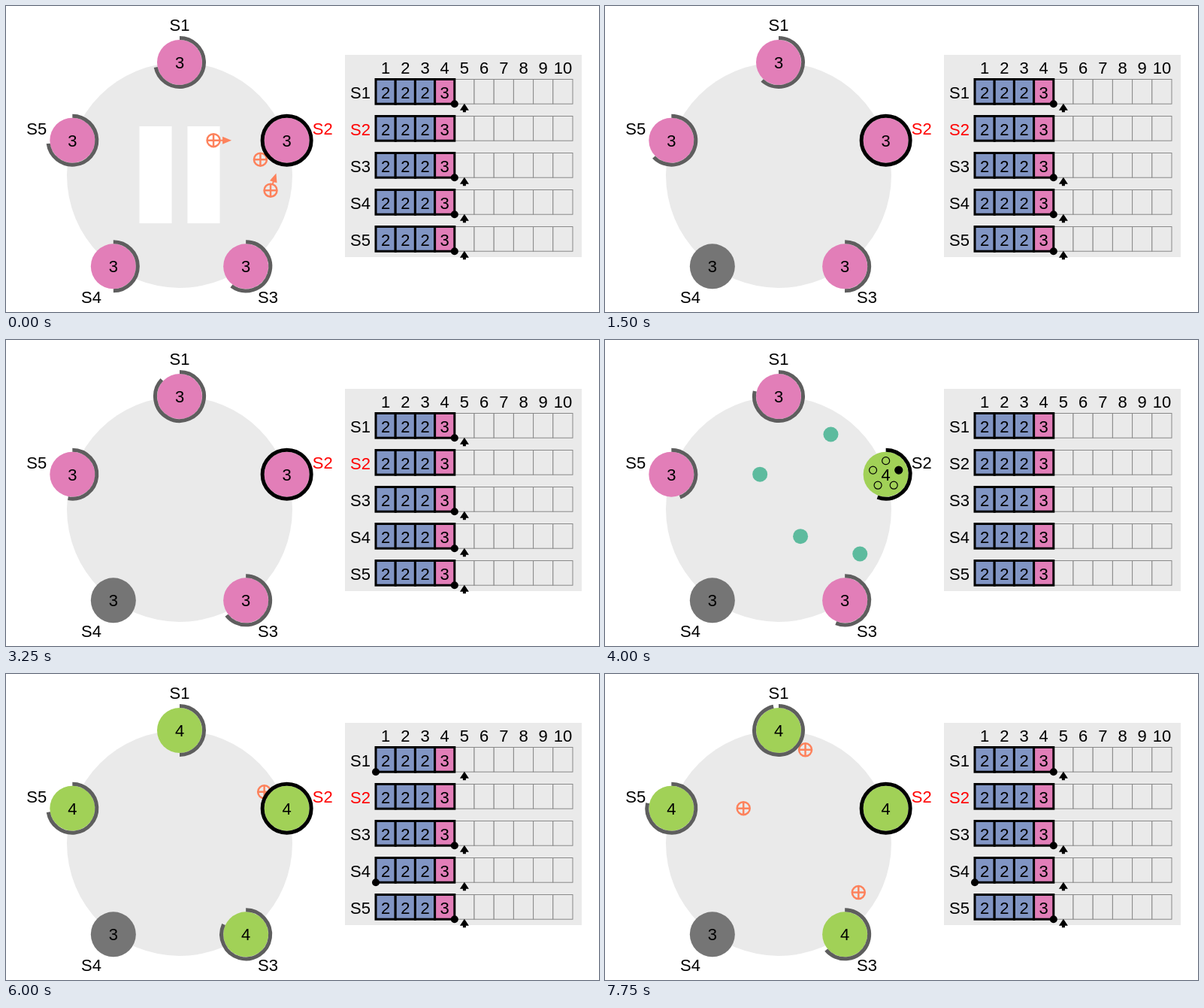
An HTML page that plays this animation: 789 by 407 pixels, repeating every 8 s.

```html
<!DOCTYPE html>
<html lang="en">
<head>
<meta charset="utf-8">
<title>Cluster election</title>
<style>
  html, body { margin: 0; width: 100%; height: 100%; overflow: hidden; background: #fff; }
  svg { display: block; width: 789px; height: 407px; }
  text { font: 22px "Liberation Sans", Arial, sans-serif; text-anchor: middle; }
</style>
</head>
<body>
<svg id="stage" viewBox="0 0 789 407"></svg>
<script>
const TERM = { 2: '#8195c4', 3: '#e27eb8', 4: '#a1d157' };
const APPEND = '#fd825c', VOTE = '#5dbb9e', PANEL = '#eaeaea';
const LEADER = 2, STOPPED = 4, CANDIDACY = 69.8, ELECTED = 95.7;
const R = 30, RING = 32.5, DEG_PER_MS = 1.8;

// Rounds of calls from the leader: [peer, request latency, reply latency, new timer angle]
const rounds = [
  { sent: -22, color: APPEND, calls: [[1, 10, 10, 280], [3, 13.8, 12.5, 231], [4, 10.25, 12.5, 201], [5, 13.25, 12.5, 278]] },
  { sent: 28.5, color: APPEND, calls: [[1, 10.4, 12.6, 351], [3, 13, 11.4, 265.5], [4, 12, 0, 0], [5, 13.5, 12.9, 222.5]] },
  { sent: CANDIDACY, color: VOTE, calls: [[1, 13.85, 13.5, 246], [3, 10.3, 12, 298.5], [4, 14.7, 0, 0], [5, 11.8, 14.1, 229]] },
  { sent: ELECTED, color: APPEND, calls: [[1, 13, 14.8, 205], [3, 10.3, 13, 324], [4, 14.2, 0, 0], [5, 13, 12, 286]] },
  { sent: 145.7, color: APPEND, calls: [[1, 15, 15, 351], [3, 13.6, 13, 236], [4, 12, 0, 0], [5, 13, 13, 289]] }
];
const peers = [1, 2, 3, 4, 5];

const polar = (cx, cy, r, deg) => {
  const a = deg * Math.PI / 180;
  return [cx + r * Math.sin(a), cy - r * Math.cos(a)];
};
const spot = (id, r = 150) => polar(231, 225, r, (id - 1) * 72);
const rect = (x, y, w, h, fill, more = '') =>
  `<rect x="${x}" y="${y}" width="${w}" height="${h}" fill="${fill}" ${more}/>`;
const disc = (x, y, r, fill, more = '') =>
  `<circle cx="${x}" cy="${y}" r="${r}" fill="${fill}" ${more}/>`;
const label = (x, y, s, fill = '#000') => `<text x="${x}" y="${y + 8}" fill="${fill}">${s}</text>`;
const stroke = (color, w) => `stroke="${color}" stroke-width="${w}"`;

function arc([x, y], deg, color) {
  const [ex, ey] = polar(x, y, RING, deg);
  return `<path d="M${x} ${y - RING}A${RING} ${RING} 0 ${deg > 180 ? 1 : 0} 1 ${ex} ${ey}" fill="none" ${stroke(color, 5)}/>`;
}

function message(from, to, frac, color, reply, paused) {
  const [x0, y0] = spot(from), [x1, y1] = spot(to);
  const dx = x1 - x0, dy = y1 - y0, dist = Math.hypot(dx, dy);
  const f = (R + frac * (dist - 2 * R)) / dist;
  const x = x0 + dx * f, y = y0 + dy * f;
  if (!reply) return disc(x, y, 10, color);
  let out = disc(x, y, 8.5, 'none', stroke(color, 2.5)) +
    `<path d="M${x - 8} ${y}h16M${x} ${y - 8}v16" ${stroke(color, 2.5)}/>`;
  if (paused) {
    const turn = Math.atan2(dy, dx) * 180 / Math.PI;
    out += `<path transform="translate(${x} ${y}) rotate(${turn})" d="M9 -1H12V-5L24 0L12 5V1H9Z" fill="${color}"/>`;
  }
  return out;
}

function messages(now, paused) {
  let out = '';
  for (const { sent, color, calls } of rounds)
    for (const [id, there, back] of calls) {
      const age = now - sent;
      if (age >= 0 && age < there) out += message(LEADER, id, age / there, color, false);
      else if (age >= there && age < there + back)
        out += message(id, LEADER, (age - there) / back, color, true, paused);
    }
  return out;
}

const callTo = (round, id) => round.calls.find(c => c[0] === id);
const replied = (round, id, now) => {
  const [, there, back] = callTo(round, id);
  return back > 0 && now >= round.sent + there + back;
};
const leading = now => now < CANDIDACY || now >= ELECTED;

function timer(id, now) {
  let deg = 0;
  for (const round of rounds) {
    const [, there, , start] = callTo(round, id);
    const age = now - round.sent - there;
    if (age >= 0) deg = start - age * DEG_PER_MS;
  }
  return deg;
}

function votes([x, y], now) {
  return peers.map(id => {
    const [vx, vy] = polar(x, y, 18, (id - 1) * 72);
    const granted = id === LEADER || replied(rounds[2], id, now);
    return disc(vx, vy, 5, granted ? '#000' : 'none', stroke('#000', 1.2));
  }).join('');
}

function server(id, now) {
  const p = spot(id), [x, y] = p;
  const down = id === STOPPED && now > 0;
  const newTerm = CANDIDACY + (id === LEADER ? 0 : callTo(rounds[2], id)[1]);
  const term = !down && now >= newTerm ? 4 : 3;
  let out = disc(x, y, R, down ? '#757575' : TERM[term]);
  if (id !== LEADER) out += down ? '' : arc(p, timer(id, now), '#5e5e5e');
  else if (leading(now)) out += disc(x, y, RING, 'none', stroke('#000', 5));
  else out += arc(p, 213 - (now - CANDIDACY) * DEG_PER_MS, '#000') + votes(p, now);
  const [lx, ly] = spot(id, 200);
  return out + label(x, y, term) + label(lx, ly, 'S' + id, nameColor(id, now));
}

const nameColor = (id, now) => id === LEADER && leading(now) ? '#f00' : '#000';

function logs(now) {
  const left = 492, w = 26.2, h = 32.7;
  let out = rect(451, 65, 315, 269, PANEL);
  for (let i = 0; i < 10; i++) out += label(left + w * (i + 0.5), 82, i + 1);
  for (const id of peers) {
    const top = 97.5 + 49 * (id - 1), bottom = top + h;
    out += label(471.5, top + 17, 'S' + id, nameColor(id, now));
    for (let i = 0; i < 10; i++) out += rect(left + w * i, top, w, h, PANEL, stroke('#888', 1));
    [2, 2, 2, 3].forEach((term, i) => {
      out += rect(left + w * i, top, w, h, TERM[term], stroke('#000', 3)) +
        label(left + w * (i + 0.5), top + 17, term);
    });
    if (id === LEADER || !leading(now)) continue;
    const match = now < CANDIDACY || replied(rounds[3], id, now) ? 4 : 0;
    out += disc(left + w * match, bottom, 5, '#000') +
      `<path d="M${left + w * 4.5} ${bottom - 0.5}l6 9h-4v2.5h-4v-2.5h-4z"/>`;
  }
  return out;
}

function scene(step) {
  const paused = step === 0;
  const now = paused ? 0 : 20 + 5.7 * (step - 4);
  return disc(231, 225, 150, PANEL) +
    (paused ? rect(177.5, 160, 43, 129, '#fff') + rect(241.5, 160, 43, 129, '#fff') : '') +
    messages(now, paused) + peers.map(id => server(id, now)).join('') + logs(now);
}

const stage = document.getElementById('stage');
let shown = -1;
function tick() {
  const step = Math.max(0, Math.floor(performance.now() % 8000 / 250) - 2);
  if (step !== shown) stage.innerHTML = scene(shown = step);
  requestAnimationFrame(tick);
}
tick();
</script>
</body>
</html>
```
